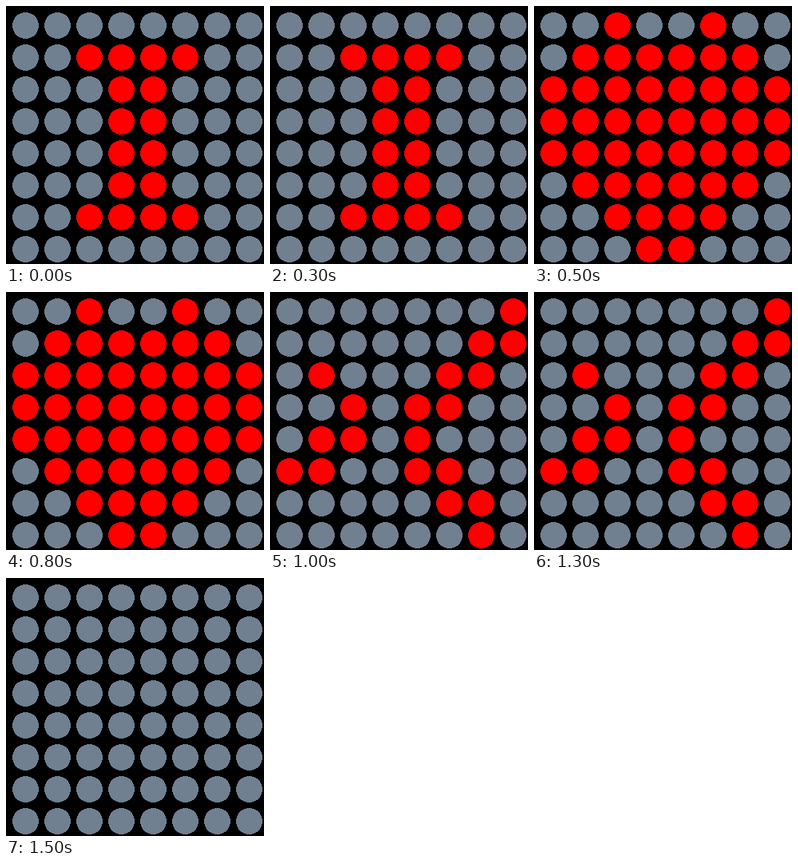
Recreate the animation shown at these times as an HTML page. Size 323x323 px, loop 2 s.

```html
<!DOCTYPE html>
<html lang="en">
<head>
<meta charset="utf-8">
<title>LED matrix</title>
<style>
html, body { margin: 0; width: 100%; height: 100%; overflow: hidden; background: #000; }
svg { display: block; width: 323px; height: 323px; }
circle { fill: #708090; shape-rendering: crispEdges; }
circle.on { fill: #f00; }
</style>
</head>
<body>
<svg id="matrix" viewBox="0 0 323 323"></svg>
<script>
const STEP = 500, SIZE = 8, PITCH = 40;

const letter = [
  "........",
  "..####..",
  "...##...",
  "...##...",
  "...##...",
  "...##...",
  "..####..",
  "........"
];
const heart = [
  "..#..#..",
  ".######.",
  "########",
  "########",
  "########",
  ".######.",
  "..####..",
  "...##..."
];
const script = [
  ".......#",
  "......##",
  ".#...##.",
  "..#.##..",
  ".##.#...",
  "##..##..",
  ".....##.",
  "......#."
];
const blank = Array(SIZE).fill(".".repeat(SIZE));
const pictures = [letter, heart, script, blank].map(rows => rows.join(""));

const svg = document.getElementById("matrix");
const leds = Array.from({ length: SIZE * SIZE }, (_, i) => {
  const led = document.createElementNS("http://www.w3.org/2000/svg", "circle");
  led.setAttribute("cx", 24.5 + (i % SIZE) * PITCH);
  led.setAttribute("cy", 24.5 + Math.floor(i / SIZE) * PITCH);
  led.setAttribute("r", 16.5);
  return svg.appendChild(led);
});

function draw(time) {
  const picture = pictures[Math.floor(time / STEP) % pictures.length];
  leds.forEach((led, i) => led.classList.toggle("on", picture[i] === "#"));
}

let start;
function tick(now) {
  start ??= now;
  draw(now - start);
  requestAnimationFrame(tick);
}
draw(0);
requestAnimationFrame(tick);
</script>
</body>
</html>
```
